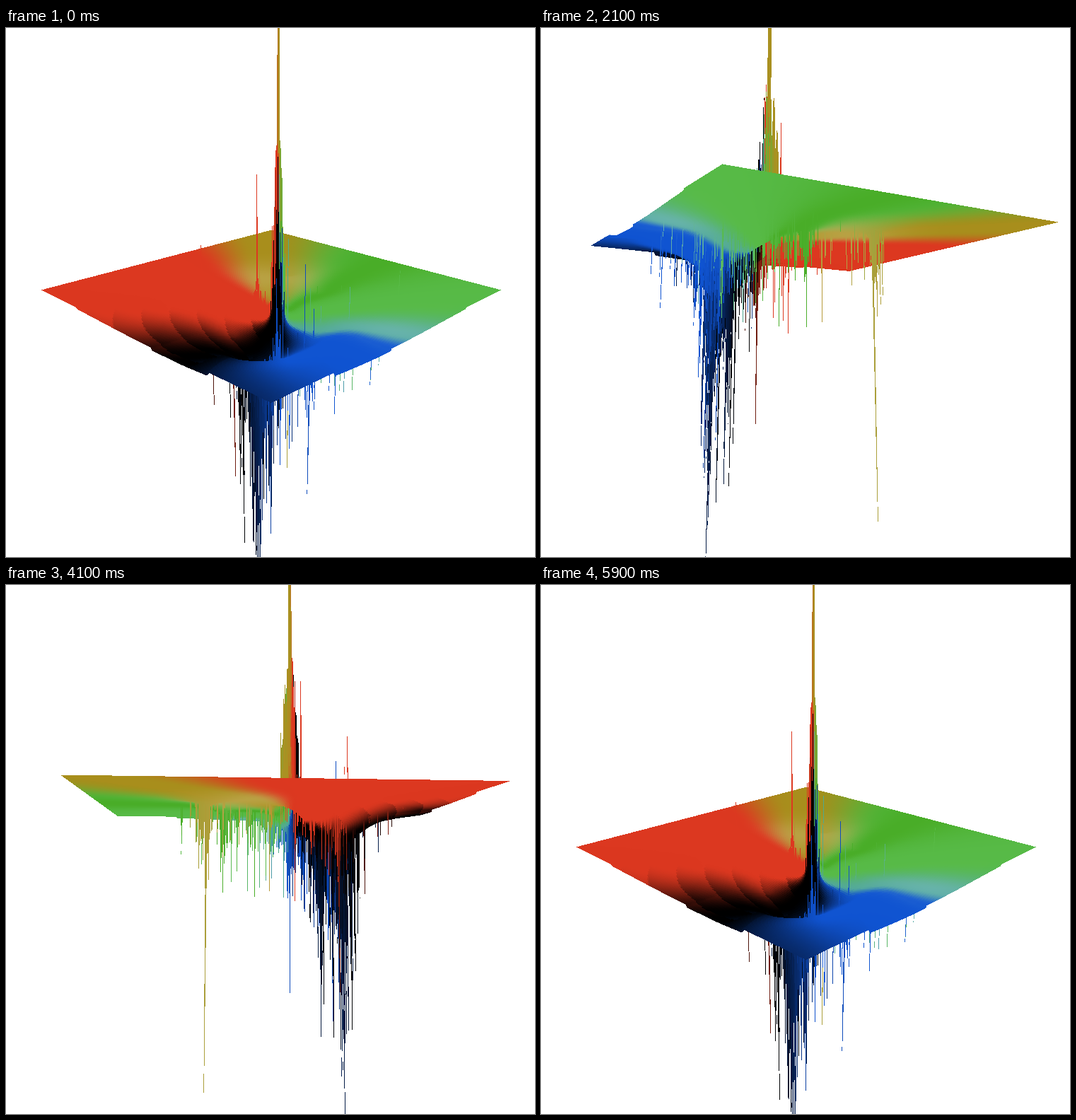
An HTML page with a canvas for the animation above (6000 ms loop, 748 px wide and 748 px high).

```html
<!DOCTYPE html>
<html>
<head>
<meta charset="utf-8">
<style>
html, body { margin: 0; width: 100%; height: 100%; overflow: hidden; background: #fff; }
canvas { display: block; }
</style>
</head>
<body>
<canvas id="c" width="748" height="748"></canvas>
<script>
const S = 748, N = 200, M = N + 1;
const ctx = document.getElementById('c').getContext('2d');
const img = ctx.createImageData(S, S);
const px = new Uint32Array(img.data.buffer);
const depthBuf = new Float32Array(S * S);

let seed = 7;
const rnd = () => {
  seed = (seed + 0x6D2B79F5) | 0;
  let t = Math.imul(seed ^ (seed >>> 15), 1 | seed);
  t = (t + Math.imul(t ^ (t >>> 7), 61 | t)) ^ t;
  return ((t ^ (t >>> 14)) >>> 0) / 4294967296;
};
const gauss = () => (rnd() + rnd() + rnd() + rnd() - 2) * 1.7;
const clamp = v => Math.max(0, Math.min(1, v));
const smooth = (lo, hi, v) => { const t = clamp((v - lo) / (hi - lo)); return t * t * (3 - 2 * t); };
const bell = (v, mid, w) => Math.exp(-(((v - mid) / w) ** 2));
const rgb = hex => [hex >> 16, hex >> 8 & 255, hex & 255];
const mix = (p, q, t) => p.map((v, i) => v + (q[i] - v) * t);

// Ground coordinates: b points to the blue corner, a to the green one
const POLE = { a: 0.027, b: 0.16 };
const poleDist = (a, b) => Math.hypot((a - POLE.a) / 0.022, (b - POLE.b) / 0.05);

const YELLOW = rgb(0xa88e1c), SAND = rgb(0xcdb973), LEAF = rgb(0x46aa20), SKY = rgb(0x82becd);
const sectors = [
  { at: -161, fade: 11, col: rgb(0xdc3820) },
  { at: -62, fade: 25, col: [0, 0, 0] },
  { at: -15, fade: 20, col: rgb(0x1054d2) },
  { at: 54, fade: 6, col: rgb(0x50a896) },
  { at: 74, fade: 18, col: rgb(0x58bb48) },
  { at: 166, fade: 14, col: YELLOW }
];

function colour(a, b) {
  const da = a - 0.03, db = b - 0.18, r = Math.hypot(da, db);
  let ang = Math.atan2(da, db) * 180 / Math.PI;
  // The yellow wedge widens towards the pole
  const off = 180 - Math.abs(ang);
  if (off < 60) ang = Math.sign(ang) * (180 - off / (1 + 0.8 * bell(r, 0, 0.5) * (1 - off / 60)));
  if (ang > -95 && ang < -30) ang += 7 * ((r * 9) % 1 - 0.5);
  let c = YELLOW;
  for (const { at, fade, col } of sectors) c = mix(c, col, smooth(at - fade, at + fade, ang));
  c = mix(c, LEAF, 0.8 * bell(ang, 140, 22));
  c = mix(c, SAND, 0.45 * bell(r, 0.35, 0.22) * smooth(145, 168, Math.abs(ang)));
  c = mix(c, SKY, 0.45 * bell(r, 0.5, 0.25) * bell(ang, 64, 13));
  const core = clamp(1.6 * (1 - Math.abs(ang + 15) / 70)) * (1 - smooth(0.08, 0.26, r));
  const rim = 0.45 * bell(ang, -5, 16) * smooth(0.45, 0.85, r);
  const [R, G, B] = c.map(v => v * (1 - core) * (1 - rim) | 0);
  return (255 << 24 | B << 16 | G << 8 | R) >>> 0;
}

// Clusters of spikes; tip is the height of the longest one
const clusters = [
  { a: -0.058, b: 0.43, size: 1, tip: -1.35 },
  { a: 0, b: 0.34, size: 0.6, tip: -1 },
  { a: -0.155, b: 0.26, size: 0.2, tip: -0.78 },
  { a: 0.155, b: 0.32, size: 0.3, tip: -0.82 },
  { a: 0.084, b: -0.29, size: 0.3, tip: -1.1 },
  { a: 0.22, b: -0.055, size: 0.25, tip: -0.4 },
  { a: -0.057, b: 0.129, size: 0.1, tip: 0.53 },
  { a: 0.02, b: 0.5, size: 0.1, tip: 0.24 }
];

// Stepped rim on the two sides that meet at the blue corner
function rimStep(a, b) {
  const sum = Math.abs(a) + b, t = Math.abs(a) / sum;
  if (b <= 0 || t < 0.21) return 0;
  const k = Math.log(t / 0.21) / Math.log(2.05);
  return k > 1.85 ? 0 : -0.035 * (1 - t) * (0.5 + 0.5 * (k % 1)) * smooth(0.6, 1, sum);
}

function height(a, b) {
  let z = rimStep(a, b) - 0.05 * bell(a, 0.05, 0.38) * bell(b, 0.33, 0.28);
  for (const f of clusters) {
    const r = Math.hypot(a - f.a, b - f.b);
    z += Math.sign(f.tip) * 0.045 * f.size * Math.max(0, Math.log((0.12 + 0.25 * f.size) / Math.max(r, 0.015)));
  }
  return z + 0.6 * Math.exp(-1.9 * poleDist(a, b));
}

const spikes = [];
const addSpike = (a, b, tip, wide) => spikes.push({ a, b, tip, wide, base: height(a, b), col: colour(a, b) });

for (const f of clusters) {
  addSpike(f.a, f.b, f.tip, 1.2);
  const sign = Math.sign(f.tip), spread = 0.02 + 0.025 * f.size;
  for (let i = 0; i < 230 * f.size; i++) {
    const r = -spread * Math.log(1 - rnd()), t = rnd() * 2 * Math.PI;
    const len = (0.1 + 0.4 * f.size) * Math.exp(-r / 0.1) * rnd() + 0.8 * f.size * rnd() ** 9;
    const a = f.a + r * Math.cos(t), b = f.b + r * Math.sin(t);
    addSpike(a, b, height(a, b) + sign * len, 1);
  }
}
for (let i = 0; i < 330; i++) {
  const a = 0.1 + 0.17 * gauss(), b = 0.24 + 0.17 * gauss();
  const len = 0.02 + 0.14 * rnd() + 0.3 * rnd() ** 8;
  addSpike(a, b, height(a, b) + (rnd() < 0.06 ? len : -len), 0.7);
}
for (let i = 0; i < 110; i++) {
  const a = POLE.a + 0.012 * gauss(), b = POLE.b + 0.034 * gauss();
  addSpike(a, b, height(a, b) * 0.5 + 1.25 * Math.exp(-1.25 * poleDist(a, b)) * (0.3 + 0.7 * rnd()), 1.3);
}
addSpike(POLE.a, POLE.b, 1.4, 2.5);

const GRID = M * M, TOTAL = GRID + 4 * spikes.length;
const A = new Float32Array(GRID), B = new Float32Array(GRID), Z = new Float32Array(GRID);
const X = new Float32Array(TOTAL), Y = new Float32Array(TOTAL), W = new Float32Array(TOTAL);
const paint = new Uint32Array(GRID);
for (let j = 0, i = 0; j < M; j++) {
  for (let k = 0; k < M; k++, i++) {
    A[i] = (k - j) / N;
    B[i] = (k + j) / N - 1;
    Z[i] = height(A[i], B[i]);
    paint[i] = colour(A[i], B[i] + 1 / N);
  }
}

function triangle(i, j, k, col) {
  const x0 = X[i], y0 = Y[i], x1 = X[j], y1 = Y[j], x2 = X[k], y2 = Y[k];
  const area = (x1 - x0) * (y2 - y0) - (x2 - x0) * (y1 - y0);
  if (!area) return;
  const l = Math.max(0, Math.ceil(Math.min(x0, x1, x2))), r = Math.min(S - 1, Math.floor(Math.max(x0, x1, x2)));
  const t = Math.max(0, Math.ceil(Math.min(y0, y1, y2))), b = Math.min(S - 1, Math.floor(Math.max(y0, y1, y2)));
  for (let y = t; y <= b; y++) {
    for (let x = l; x <= r; x++) {
      const p = ((x1 - x) * (y2 - y) - (x2 - x) * (y1 - y)) / area;
      const q = ((x2 - x) * (y0 - y) - (x0 - x) * (y2 - y)) / area;
      const s = 1 - p - q;
      if (p < 0 || q < 0 || s < 0) continue;
      const w = p * W[i] + q * W[j] + s * W[k], o = y * S + x;
      if (w > depthBuf[o]) { depthBuf[o] = w; px[o] = col; }
    }
  }
}

function quad(i, j, k, l, col) {
  triangle(i, j, k, col);
  triangle(j, l, k, col);
}

function draw(step) {
  // Two turns while the camera sinks below the surface and rises again
  const th = 2 * Math.PI * step / 59, c = Math.cos(th), level = 1 - c * c;
  const cp = Math.cos(2 * th), sp = Math.sin(2 * th);
  const el = Math.atan(0.004 + 0.358 * c + 0.01 * level);
  const ce = Math.cos(el), se = Math.sin(el), dist = 2.885 / ce;
  const cy = 324 + 46 * c + (14 * c + 3) * level;

  const project = (i, a, b, z, shift) => {
    const near = b * cp - a * sp;
    const w = 1 / (dist - near * ce - z * se);
    X[i] = 374.5 + 998 * w * (a * cp + b * sp) + shift;
    Y[i] = cy - 998 * w * (z * ce - near * se);
    W[i] = w;
  };

  px.fill(0xffffffff);
  depthBuf.fill(0);
  for (let i = 0; i < GRID; i++) project(i, A[i], B[i], Z[i], 0);
  for (let j = 0; j < N; j++) {
    for (let k = 0; k < N; k++) {
      const i = j * M + k;
      quad(i, i + 1, i + M, i + M + 1, paint[i]);
    }
  }
  spikes.forEach((s, n) => {
    const i = GRID + 4 * n;
    for (const side of [0, 1]) {
      const dir = side * 2 - 1;
      project(i + side, s.a, s.b, s.base, dir * s.wide);
      project(i + 2 + side, s.a, s.b, s.tip, dir * 0.38);
    }
    quad(i, i + 1, i + 2, i + 3, s.col);
  });
  ctx.putImageData(img, 0, 0);
}

const start = performance.now();
let shown = -1;
function tick() {
  const step = Math.floor((performance.now() - start) / 100) % 60;
  if (step !== shown) draw(shown = step);
  requestAnimationFrame(tick);
}
tick();
</script>
</body>
</html>
```
